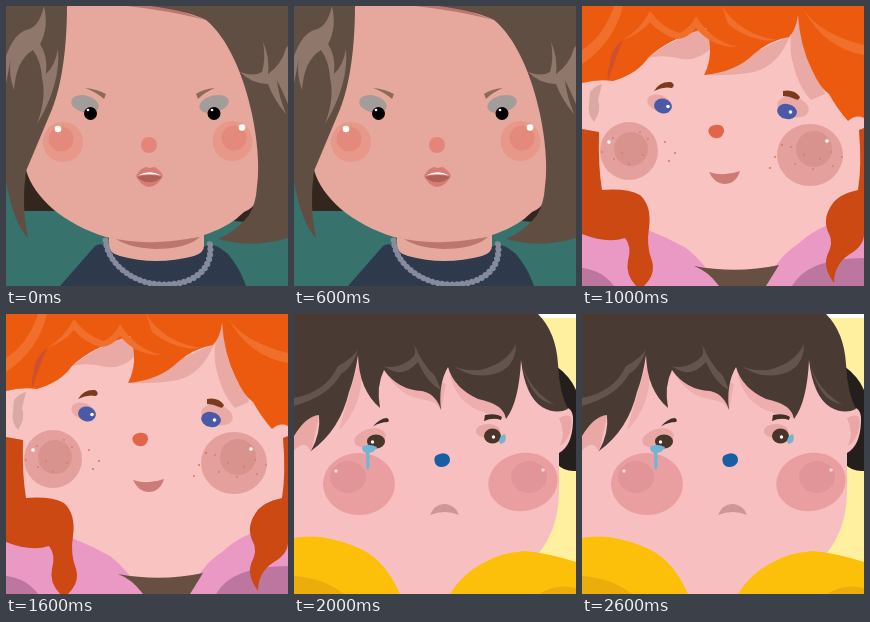
Recreate the animation shown at these times as an HTML page. Size 282 px wide and 280 px high, loop 3000 ms.

```html
<!DOCTYPE html>
<html lang="en">
<head>
<meta charset="utf-8">
<title>Three faces</title>
<style>
html, body { margin: 0; width: 100%; height: 100%; overflow: hidden; }
svg { display: block; width: 282px; height: 280px; }
.face { visibility: hidden; animation: show 3s step-end infinite; }
.second { animation-delay: -2s; }
.third { animation-delay: -1s; }
@keyframes show {
  0% { visibility: visible; }
  33.3333%, 100% { visibility: hidden; }
}
.line { fill: none; stroke-linecap: round; stroke-linejoin: round; }
</style>
</head>
<body>
<svg viewBox="0 0 282 280">
  <defs>
    <pattern id="knit" width="4" height="4" patternUnits="userSpaceOnUse">
      <path fill="#2d384a" d="M0 0H4V4H0Z"/>
      <path class="line" stroke="#3b4759" stroke-width=".7" d="M.6 1L1.6 2M2.6 3L3.4 3.8"/>
    </pattern>
  </defs>

  <!-- Bob haircut and pearls -->
  <g class="face">
    <path fill="#37736c" d="M0 0H282V280H0Z"/>
    <path fill="#33261f" d="M18 158L15 205H52L40 160ZM246 190L228 215L239 216L248 204Z"/>
    <path fill="url(#knit)" d="M54 280L89 240Q94 236 104 241H198Q206 234 222 248Q234 262 240 280Z"/>
    <path fill="#e6a79c" d="M103 226H198V240Q198 247 188 250Q150 260 114 250Q103 247 103 240Z"/>
    <path fill="#bd766e" d="M106 230Q150 238 194 231Q180 243 150 243Q120 242 106 230Z"/>
    <path fill="#e6a79c" d="M50 0H210L262 60V170Q254 200 238 206Q210 234 152 236Q124 237 100 231C58 218 28 192 20 164L30 80Z"/>
    <path fill="#bd766e" d="M121 0H160L200 14Q160 4 121 0Z"/>
    <g fill="#614e43">
      <path d="M0 0H61C61 40 56 82 44 108L20 165Q15 200 22 232Q8 218 0 176Z"/>
      <path d="M144 0H282V232Q246 243 212 233Q232 224 243 209Q250 198 251 180C254 160 251 132 246 108C238 70 222 32 200 14Q182 5 144 0Z"/>
    </g>
    <g fill="#8f786b">
      <path d="M0 50Q8 28 20 24Q33 22 38 0Q43 22 34 38Q42 50 40 68Q49 60 52 43Q55 78 31 118Q41 91 36 72Q35 55 27 44Q10 54 8 84Q2 67 5 52L0 77Z"/>
      <path d="M257 36Q264 52 262 68Q276 58 280 42L282 40V98Q276 84 271 74Q272 88 280 108Q268 94 262 78Q246 78 234 66Q248 71 256 66Q260 52 257 36Z"/>
    </g>
    <path fill="#8d6d58" d="M79 82Q91 83 100 88L98 93Q90 86 79 82ZM209 82Q197 83 190 88L192 93Q199 86 209 82Z"/>
    <g fill="#a39c99">
      <ellipse cx="79" cy="98" rx="14" ry="8.500" transform="rotate(15 79 98)"/>
      <ellipse cx="208" cy="98" rx="15" ry="8.500" transform="rotate(-15 208 98)"/>
    </g>
    <circle cx="84.500" cy="107.500" r="6.500"/>
    <circle cx="208" cy="107.500" r="6.500"/>
    <g fill="#e89888"><circle cx="57" cy="136" r="20"/><circle cx="226.500" cy="135" r="20"/></g>
    <g fill="#e48a7d"><circle cx="55" cy="133" r="12.500"/><circle cx="228" cy="132" r="12.500"/></g>
    <circle cx="143" cy="139" r="8" fill="#e48579"/>
    <g fill="#fff">
      <circle cx="52" cy="123" r="3.300"/><circle cx="236" cy="121.500" r="3.300"/>
      <circle cx="82" cy="104" r="1.300"/><circle cx="206" cy="104" r="1.300"/>
    </g>
    <path fill="#da7b72" d="M130 170Q134 162 140 161L144 162L148 161Q154 163 157 170Q152 180 143 181Q135 180 130 170Z"/>
    <path fill="#af6059" d="M131 171Q144 167 156 171Q150 177 143 176Q136 176 131 171Z"/>
    <path fill="#fff" d="M132 169.500Q144 163 155 169.500Q144 167 132 169.500Z"/>
    <g class="line">
      <path id="pearls" stroke="#858b9c" stroke-width="5.400" stroke-dasharray="0 5" d="M100 235C102 258 128 279 158 279C190 279 209 262 204 236"/>
      <use href="#pearls" x="-.8" y="-.8" style="stroke:#c3c8d2;stroke-width:2.600px"/>
    </g>
  </g>

  <!-- Red hair and freckles -->
  <g class="face second">
    <path fill="#f8c3c1" d="M0 0H282V280H0Z"/>
    <path fill="#dba9a3" d="M8 86Q14 79 20 78L16 94Q20 104 12 116Q5 108 7 98Z"/>
    <path fill="#ea98c4" d="M0 224H66Q86 232 104 242Q120 254 137 280H0ZM184 280Q192 254 216 238Q244 212 282 213V280Z"/>
    <path fill="#bc769f" d="M0 262Q20 264 32 280H0ZM210 280Q226 252 282 252V280Z"/>
    <path fill="#675042" d="M112 260Q155 268 197 259L184 280H137Q126 265 112 260Z"/>
    <g fill="#e9aaa6">
      <path d="M66 52Q88 34 124 22L129 42Q117 55 100 53Q82 48 66 52ZM122 69Q148 70 172 66Q196 60 208 30ZM216 9Q207 22 209 48Q214 78 229 94L243 88Z"/>
      <ellipse cx="77" cy="97" rx="12" ry="8" transform="rotate(20 77 97)"/>
      <ellipse cx="211" cy="101" rx="16" ry="10" transform="rotate(15 211 101)"/>
    </g>
    <path fill="#cd4913" d="M0 123L17 126Q16 160 20 184Q45 182 58 189Q70 200 67 222Q64 240 70 255Q74 268 62 280H54Q43 268 46 255Q50 240 43 232Q25 238 0 228ZM282 122L277 124Q280 160 276 184Q256 188 249 200Q240 214 247 228Q252 236 245 250Q241 262 252 277Q252 258 268 248Q282 240 282 228Z"/>
    <path fill="#ec5a0f" d="M0 0H282V112Q274 108 266 115Q256 104 247 88Q238 82 230 64Q218 40 216 9Q214 24 207 31Q188 34 172 48Q154 66 122 69Q133 48 124 22Q84 34 66 52Q55 68 31 75Q16 73 0 77Z"/>
    <path fill="#cf5030" d="M26 75Q32 56 41 34Q28 44 28 57Q25 66 26 75Z"/>
    <g fill="#ef6f2b">
      <path d="M0 44Q22 30 32 0H41Q32 37 0 58ZM41 34Q58 24 68 5Q80 22 98 27Q108 22 114 10Q130 36 156 41Q130 42 114 22Q104 34 94 33Q78 28 68 16Q58 28 41 34ZM140 0Q159 29 195 34Q170 37 146 18ZM222 4Q238 28 282 39V49Q242 42 222 4Z"/>
    </g>
    <path fill="#7a3a1c" d="M72 85Q78 75 89 76Q94 79 90 82Q81 80 72 85ZM201 85Q212 83 218 91Q217 95 213 93Q207 90 201 90Z"/>
    <g fill="#4a5aa8">
      <ellipse cx="81" cy="100" rx="9" ry="7.500" transform="rotate(12 81 100)"/>
      <ellipse cx="205" cy="105.500" rx="10" ry="7.500" transform="rotate(12 205 105.500)"/>
    </g>
    <path fill="#e2654a" d="M128 121Q134 117 140 120Q144 124 140 130Q136 134 130 131Q124 126 128 121Z"/>
    <g fill="#e3a09c"><circle cx="47" cy="145" r="29"/><ellipse cx="228" cy="149" rx="33" ry="31"/></g>
    <g fill="#d9938f"><circle cx="49" cy="143" r="17"/><circle cx="232" cy="143" r="18"/></g>
    <path class="line" stroke="#e3744e" stroke-width="2" d="M83 136h0M93 147h0M87 155h0M193 151h0M188 162h0M200 139h0"/>
    <path class="line" stroke="#d87a64" stroke-width="1.800" d="M20 146h0M31 132h0M32 153h0M40 147h0M47 158h0M58 126h0M61 149h0M66 133h0M209 141h0M213 158h0M222 149h0M231 163h0M238 153h0M249 146h0M251 160h0M260 151h0"/>
    <g fill="#fff">
      <circle cx="86" cy="100.500" r="1.800"/><circle cx="208.500" cy="106" r="1.800"/>
      <circle cx="27" cy="136" r="1.800"/><circle cx="245" cy="135" r="1.800"/>
    </g>
    <path fill="#cd7b76" d="M127 166Q142 171 158 165Q154 178 142 178Q132 177 127 166Z"/>
  </g>

  <!-- Brown hair and tears -->
  <g class="face third">
    <path fill="#fff" d="M0 0H282V280H0Z"/>
    <path fill="#fff0a0" d="M230 4H282V280H230Z"/>
    <path fill="#241e1d" d="M262 52Q276 62 282 76V157Q270 158 262 149Z"/>
    <path fill="#f8bfc1" d="M0 30H240L262 95Q280 88 279 108Q278 132 265 139V180Q264 216 244 240L190 280H90L0 240Z"/>
    <g fill="#e9a7a6">
      <path d="M265 104Q277 98 278 107Q277 125 266 132Q272 119 265 104ZM0 118Q14 96 26 98L17 138Q11 124 0 137Z"/>
      <path d="M90 56Q106 84 132 86Q142 88 147 96L152 70L110 50ZM155 56Q160 90 192 99L212 104L210 80ZM64 50L45 116Q66 96 68 62Z" opacity=".7"/>
      <ellipse cx="76" cy="124" rx="16" ry="9" transform="rotate(-15 76 124)"/>
      <ellipse cx="194" cy="117" rx="12" ry="7"/>
    </g>
    <path fill="#493a34" d="M0 0H244Q262 18 264 50Q265 78 274 95Q262 101 248 93Q231 82 227 46Q225 88 212 105Q210 90 184 85Q160 74 154 53Q144 70 147 96Q142 80 128 77Q104 76 90 56Q82 72 86 94Q65 76 64 41Q61 62 55 78Q46 116 17 137Q27 119 25 101Q12 102 0 122Z"/>
    <g fill="#63544e">
      <path d="M0 84Q32 78 44 52Q56 46 64 36Q58 54 47 60Q35 82 0 92ZM90 52Q106 56 120 42Q122 38 120 30Q128 50 141 62L147 76Q134 70 124 48Q108 66 90 52ZM155 48Q164 58 186 56Q212 50 222 30Q222 54 200 60Q174 66 155 48ZM228 50Q237 78 260 90Q238 88 228 50Z"/>
    </g>
    <path fill="#413029" d="M79 112.500Q86 104 93 104Q96 106 94 108Q86 108 79 112.500ZM191 101Q202 99 208 103L207 106Q199 103 190 107Z"/>
    <g fill="#4a352a">
      <ellipse cx="82" cy="127.500" rx="9" ry="7"/>
      <ellipse cx="198.500" cy="122" rx="8.500" ry="7.500"/>
    </g>
    <g fill="#fff"><circle cx="78.500" cy="128" r="1.700"/><circle cx="199.500" cy="123" r="1.700"/></g>
    <g fill="#e99ea0">
      <ellipse cx="65" cy="170" rx="36" ry="31"/>
      <ellipse cx="229" cy="168" rx="35" ry="29" transform="rotate(-12 229 168)"/>
    </g>
    <g fill="#e19599"><ellipse cx="54" cy="163" rx="18" ry="16"/><ellipse cx="235" cy="163" rx="18" ry="16"/></g>
    <g fill="#fbd9d8"><circle cx="42" cy="157" r="1.800"/><circle cx="249" cy="156" r="1.800"/></g>
    <path fill="#70b5d3" d="M68 133Q75 129 83 133Q81 138 75.500 139V152Q75 157 72.500 155L72 139Q68 138 68 133ZM205 127Q206 121 211 120Q214 129 206 130Z"/>
    <path fill="#175fa3" d="M143 141Q151 137 155 142Q158 148 152 152Q144 155 141 149Q139 143 143 141Z"/>
    <path fill="#cc9796" d="M136 201Q141 189 152 190Q162 192 165 201Q151 195 136 201Z"/>
    <path fill="#fcc00b" d="M0 224Q30 218 69 236Q92 248 106 280H0ZM156 280Q168 260 189 249Q209 238 231 237Q254 239 282 248V280Z"/>
    <path fill="#ebad0b" d="M0 262Q30 264 50 280H0ZM245 280Q262 269 282 274V280Z"/>
  </g>
</svg>
</body>
</html>
```
